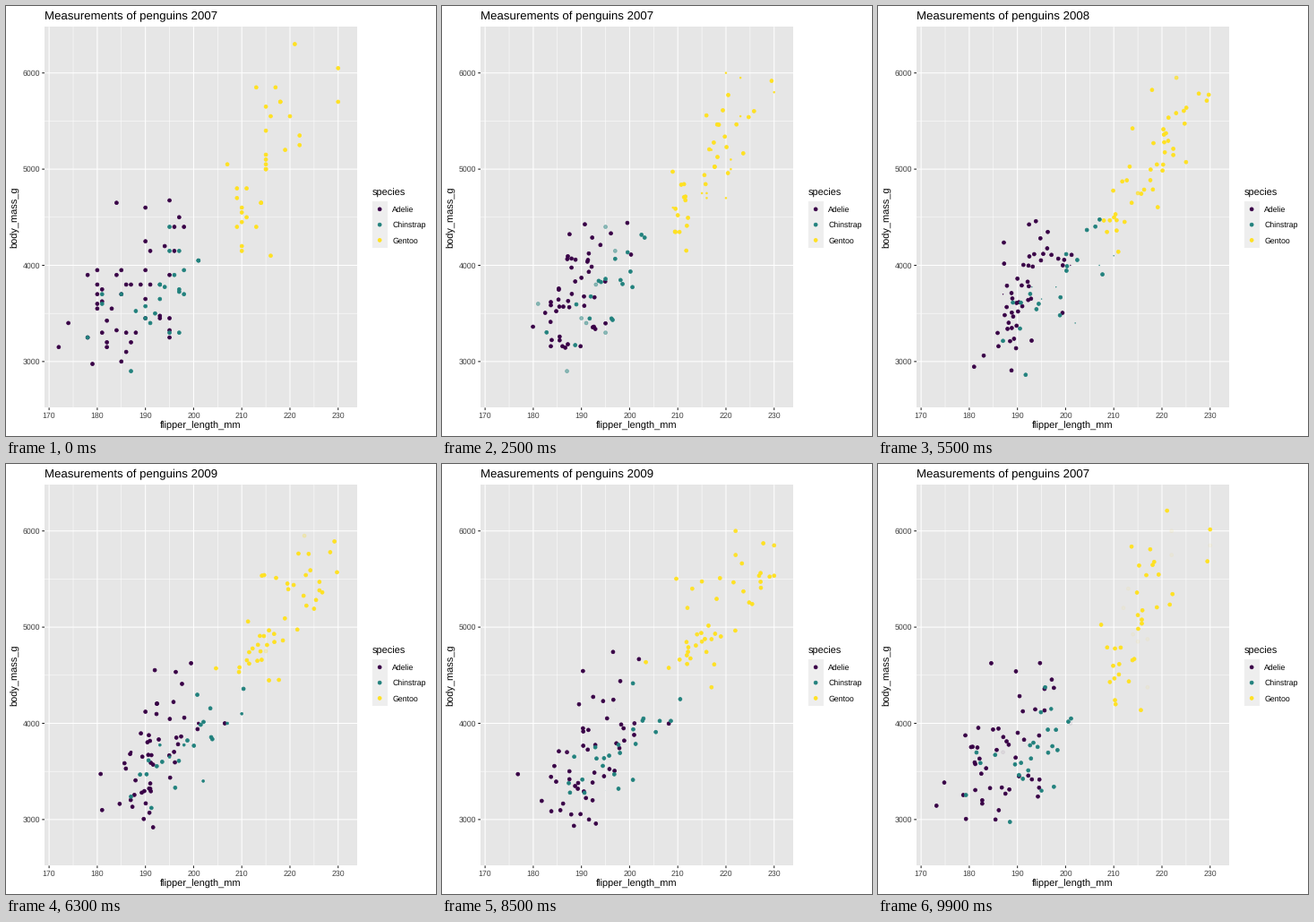
Animation of 480x480 px, one loop 10000 ms. Source, as a matplotlib script:

```python
import math

import matplotlib.pyplot as plt
import numpy as np
from matplotlib.animation import FuncAnimation
from matplotlib.colors import to_rgba
from matplotlib.patches import Rectangle

plt.rcParams["font.family"] = "Liberation Sans"
plt.rcParams["text.hinting"] = "none"

SIZE, DPI = 480, 72
LEFT, RIGHT, TOP, BOTTOM = 43.0, 392.0, 23.2, 448.4
X_MIN, X_MAX, Y_MIN, Y_MAX = 169.05, 233.95, 2520, 6480
RADIUS, STROKE = 1.955, 0.71
YEARS = (2007, 2008, 2009)
TWEENS = ((17, 17), (51, 17), (85, 16))  # first frame, length
NA = math.nan


def pairs(flipper, mass):
    return np.column_stack([flipper, mass]).astype(float)


# Rows keep their order: row n of one year moves to row n of the next.
adelie_07 = pairs(
    [181, 186, 195, NA, 193, 190, 181, 195, 193, 190, 186, 180, 182, 191, 198, 185, 195,
     197, 184, 194, 174, 180, 189, 185, 180, 187, 183, 187, 172, 180, 178, 178, 188, 184,
     195, 196, 190, 180, 181, 184, 182, 195, 186, 196, 185, 190, 182, 179, 190, 191],
    [3750, 3800, 3250, NA, 3450, 3650, 3625, 4675, 3475, 4250, 3300, 3700, 3200, 3800,
     4400, 3700, 3450, 4500, 3325, 4200, 3400, 3600, 3800, 3950, 3800, 3800, 3550, 3200,
     3150, 3950, 3250, 3900, 3300, 3900, 3325, 4150, 3950, 3550, 3300, 4650, 3150, 3900,
     3100, 4400, 3000, 4600, 3425, 2975, 3450, 4150])
adelie_08 = pairs(
    [186, 188, 190, 200, 187, 191, 186, 193, 181, 194, 185, 195, 185, 192, 184, 192, 195,
     188, 190, 198, 190, 190, 196, 197, 190, 195, 191, 184, 187, 195, 189, 196, 187, 193,
     191, 194, 190, 189, 189, 190, 202, 205, 185, 186, 187, 208, 190, 196, 178, 192],
    [3500, 4300, 3450, 4050, 2900, 3700, 3550, 3800, 2850, 3750, 3150, 4400, 3600, 4050,
     2850, 3950, 3350, 4100, 3050, 4450, 3600, 3900, 3550, 4150, 3700, 4250, 3700, 3900,
     3550, 4000, 3200, 4700, 3800, 4200, 3350, 3550, 3800, 3500, 3950, 3600, 3550, 4300,
     3400, 4450, 3300, 4300, 3700, 4350, 2900, 4100])
adelie_09 = pairs(
    [192, 203, 183, 190, 193, 184, 199, 190, 181, 197, 198, 191, 193, 197, 191, 196, 188,
     199, 189, 189, 187, 198, 176, 202, 186, 199, 191, 195, 191, 210, 190, 197, 193, 199,
     187, 190, 191, 200, 185, 193, 193, 187, 188, 190, 192, 185, 190, 184, 195, 193, 187,
     201],
    [3725, 4725, 3075, 4250, 2925, 3550, 3750, 3900, 3175, 4775, 3825, 4600, 3200, 4275,
     3900, 4075, 2900, 3775, 3350, 3325, 3150, 3500, 3450, 3875, 3050, 4000, 3275, 4300,
     3050, 4000, 3325, 3500, 3500, 4475, 3425, 3900, 3175, 3975, 3400, 4250, 3400, 3475,
     3050, 3725, 3000, 3650, 4250, 3475, 3450, 3750, 3700, 4000])

gentoo_07 = pairs(
    [211, 230, 210, 218, 215, 210, 211, 219, 209, 215, 214, 216, 214, 213, 210, 217, 210,
     221, 209, 222, 218, 215, 213, 215, 215, 215, 216, 215, 210, 220, 222, 209, 207, 230],
    [4500, 5700, 4450, 5700, 5400, 4550, 4800, 5200, 4400, 5150, 4650, 5550, 4650, 5850,
     4200, 5850, 4150, 6300, 4800, 5350, 5700, 5000, 4400, 5050, 5000, 5100, 4100, 5650,
     4600, 5550, 5250, 4700, 5050, 6050])
gentoo_08 = pairs(
    [220, 220, 213, 219, 208, 208, 208, 225, 210, 216, 222, 217, 210, 225, 213, 215, 210,
     220, 210, 225, 217, 220, 208, 220, 208, 224, 208, 221, 214, 231, 219, 230, 214, 229,
     220, 223, 216, 221, 221, 217, 216, 230, 209, 220, 215, 223],
    [5150, 5400, 4950, 5250, 4350, 5350, 3950, 5700, 4300, 4750, 5550, 4900, 4200, 5400,
     5100, 5300, 4850, 5300, 4400, 5000, 4900, 5050, 4300, 5000, 4450, 5550, 4200, 5300,
     4400, 5650, 4700, 5700, 4650, 5800, 4700, 5550, 4750, 5000, 5100, 5200, 4700, 5800,
     4600, 6000, 4750, 5950])
gentoo_09 = pairs(
    [212, 221, 212, 224, 212, 228, 218, 218, 212, 230, 218, 228, 212, 224, 214, 226, 216,
     222, 203, 225, 219, 228, 215, 228, 216, 215, 210, 219, 208, 209, 216, 229, 213, 230,
     217, 230, 217, 222, 214, NA, 215, 222, 212, 213],
    [4625, 5450, 4725, 5350, 4750, 5600, 4600, 5300, 4875, 5550, 4950, 5400, 4750, 5650,
     4850, 5200, 4925, 4875, 4625, 5250, 4850, 5600, 4975, 5500, 4725, 5500, 4700, 5500,
     4575, 5500, 5000, 5950, 4650, 5500, 4375, 5850, 4875, 6000, 4925, NA, 4850, 5750,
     5200, 5400])

chinstrap_07 = pairs(
    [192, 196, 193, 188, 197, 198, 178, 197, 195, 198, 193, 194, 185, 201, 190, 201, 197,
     181, 190, 195, 181, 191, 187, 193, 195, 197],
    [3500, 3900, 3650, 3525, 3725, 3950, 3250, 3750, 4150, 3700, 3800, 3775, 3700, 4050,
     3575, 4050, 3300, 3700, 3450, 4400, 3600, 3400, 2900, 3800, 3300, 4150])
chinstrap_08 = pairs(
    [200, 200, 191, 205, 187, 201, 187, 203, 195, 199, 195, 210, 192, 205, 210, 187, 196,
     196],
    [3400, 3800, 3700, 4550, 3200, 4300, 3350, 4100, 3600, 3900, 3850, 4800, 2700, 4500,
     3950, 3650, 3550, 3500])
chinstrap_09 = pairs(
    [196, 201, 190, 212, 187, 198, 199, 201, 193, 203, 187, 197, 191, 203, 202, 194, 206,
     189, 195, 207, 202, 193, 210, 198],
    [3675, 4450, 3400, 4300, 3250, 3675, 3325, 3950, 3600, 4050, 3350, 3450, 3250, 4050,
     3800, 3525, 3950, 3650, 3650, 4000, 3400, 3775, 4100, 3775])

COLORS = {"Adelie": "#380046", "Chinstrap": "#21817d", "Gentoo": "#ffe122"}
GROUPS = {  # in drawing order
    "Adelie": (adelie_07, adelie_08, adelie_09),
    "Gentoo": (gentoo_07, gentoo_08, gentoo_09),
    "Chinstrap": (chinstrap_07, chinstrap_08, chinstrap_09),
}


def px(x):
    return LEFT + (x - X_MIN) / (X_MAX - X_MIN) * (RIGHT - LEFT)


def py(y):
    return BOTTOM - (y - Y_MIN) / (Y_MAX - Y_MIN) * (BOTTOM - TOP)


fig = plt.figure(figsize=(SIZE / DPI, SIZE / DPI), dpi=DPI, facecolor="white")
ax = fig.add_axes([0, 0, 1, 1])
ax.set_xlim(0, SIZE)
ax.set_ylim(SIZE, 0)
ax.axis("off")


def box(x, y, w, h, color):
    ax.add_patch(Rectangle((x, y), w, h, fc=color, ec="none", zorder=0))


def line(xs, ys, width, color="white"):
    ax.plot(xs, ys, color=color, lw=width, solid_capstyle="butt", snap=False, zorder=1)


def label(x, y, text, size, color="black", **kw):
    return ax.text(x, y, text, fontsize=size, color=color, va="baseline", **kw)


def draw_panel():
    box(LEFT, TOP, RIGHT - LEFT, BOTTOM - TOP, "#e6e6e6")
    for x in range(175, 230, 10):
        line([px(x)] * 2, [TOP, BOTTOM], 0.533)
    for y in range(3500, 6000, 1000):
        line([LEFT, RIGHT], [py(y)] * 2, 0.533)
    for x in range(170, 231, 10):
        line([px(x)] * 2, [TOP, BOTTOM], 1.067)
        line([px(x)] * 2, [BOTTOM, BOTTOM + 2.75], 1.067, "#262626")
        label(px(x), 459.7, str(x), 8.8, "#414141", ha="center")
    for y in range(3000, 6001, 1000):
        line([LEFT, RIGHT], [py(y)] * 2, 1.067)
        line([LEFT - 2.75, LEFT], [py(y)] * 2, 1.067, "#262626")
        label(LEFT - 4.95, py(y) + 3.15, str(y), 8.8, "#414141", ha="right")
    label((LEFT + RIGHT) / 2, 472.2, "flipper_length_mm", 11, ha="center")
    ax.text(13.4, (TOP + BOTTOM) / 2, "body_mass_g", fontsize=11, rotation=90,
            rotation_mode="anchor", ha="center", va="baseline")


def draw_legend():
    left, top, key = 408.5, 218.2, 17.28
    label(left, 211.8, "species", 11)
    box(left, top, key, 3 * key, "#eeeeee")
    mids = [top + key * (n + 0.5) for n in range(3)]
    ax.scatter([left + key / 2] * 3, mids, s=(2 * RADIUS) ** 2, c=list(COLORS.values()),
               edgecolors=list(COLORS.values()), linewidths=STROKE, zorder=3)
    for name, y in zip(COLORS, mids):
        label(left + key + 5.5, y + 3.15, name, 8.8)


def moment(frame):
    """State left, progress to the next one, index of the year in the title."""
    for state, (start, length) in enumerate(TWEENS):
        if frame < start + length:
            step = max(0, frame - start + 1)
            shown = (state + (step > math.ceil(length / 2))) % 3
            return state, step / length, shown


def tween(a, b, t):
    """Positions, scale and opacity: shared rows move, others fade out or grow in."""
    if t == 0 or t == 1:
        rows = b if t else a
        return rows, np.ones(len(rows)), np.ones(len(rows))
    n, out, new = min(len(a), len(b)), max(0, len(a) - len(b)), max(0, len(b) - len(a))
    rows = np.vstack([a[:n] + (b[:n] - a[:n]) * t, a[n:], b[n:]])
    scale = np.r_[np.ones(n + out), np.full(new, t)]
    alpha = np.r_[np.ones(n), np.full(out, 1 - t), np.ones(new)]
    return rows, scale, alpha


draw_panel()
draw_legend()
title = label(LEFT, 15, "", 13.2)
dots = ax.scatter([], [], zorder=3)


def update(frame):
    state, t, shown = moment(frame)
    rows, scales, colors = [], [], []
    for name, years in GROUPS.items():
        pos, scale, alpha = tween(years[state], years[(state + 1) % 3], t)
        rgba = np.tile(to_rgba(COLORS[name]), (len(pos), 1))
        rgba[:, 3] = alpha
        seen = ~np.isnan(pos[:, 0])
        rows.append(pos[seen])
        scales.append(scale[seen])
        colors.append(rgba[seen])
    rows, scales, colors = np.vstack(rows), np.concatenate(scales), np.vstack(colors)
    dots.set_offsets(np.column_stack([px(rows[:, 0]), py(rows[:, 1])]))
    dots.set_sizes((2 * RADIUS * scales) ** 2)
    dots.set_linewidths(STROKE * scales)
    dots.set_facecolors(colors)
    dots.set_edgecolors(colors)
    title.set_text(f"Measurements of penguins {YEARS[shown]}")
    return dots, title


anim = FuncAnimation(fig, update, frames=100, interval=100, repeat=True, repeat_delay=0,
                     init_func=lambda: update(0), blit=False)
plt.show()
```
